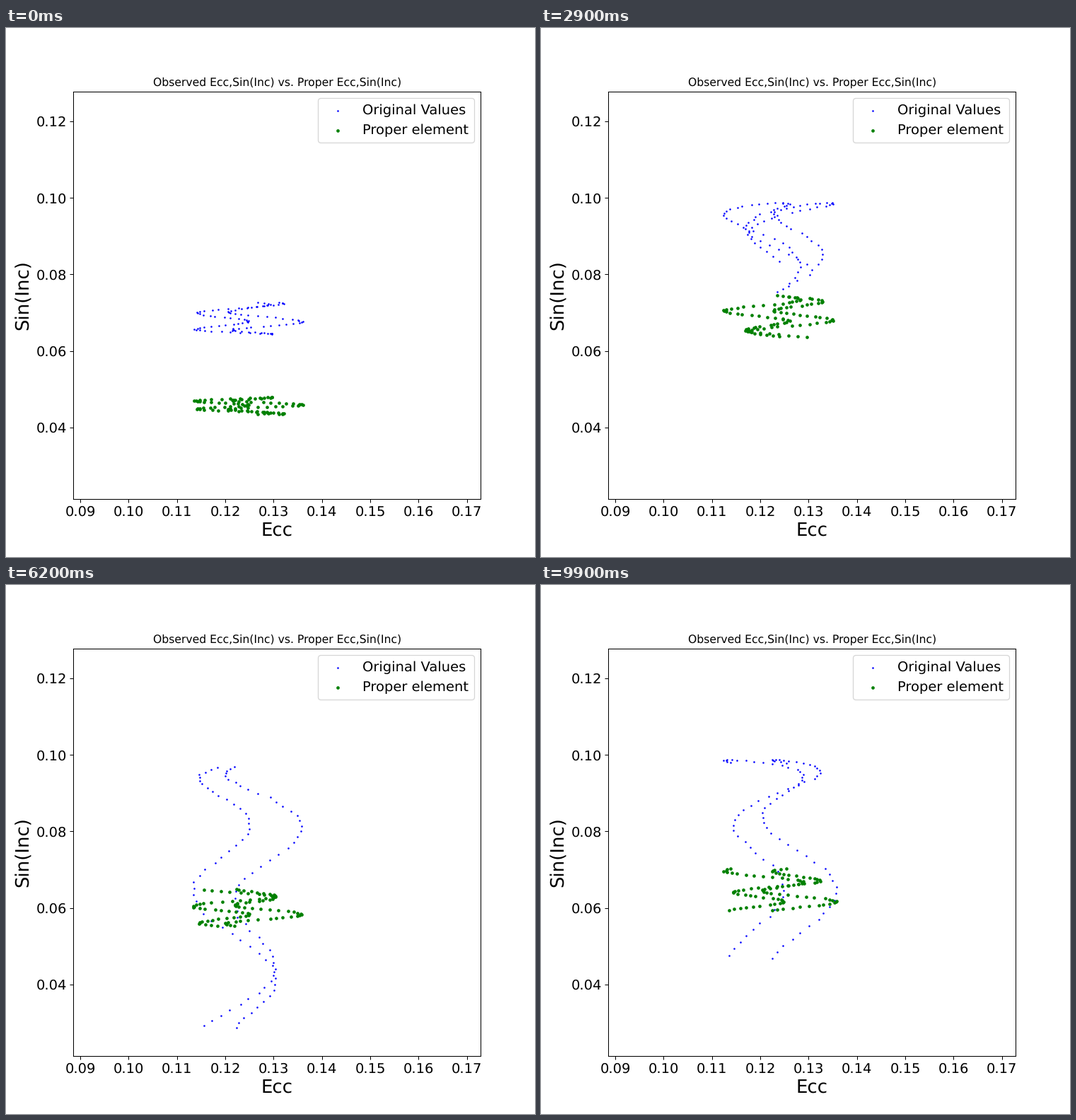
A matplotlib script for the animation above (10 s loop, 748 by 748 pixels).

```python
import numpy as np
import matplotlib.pyplot as plt
from matplotlib.animation import FuncAnimation

FRAMES, INTERVAL = 100, 100
POINTS = 100
SIZE = 748

plt.rcParams["text.hinting"] = "none"

k = np.arange(POINTS)
u = k / (POINTS - 1)              # position inside one time window
side = np.where(k % 2, 1, -1)     # alternate samples fall on two strands


def wave(cycles):
    return np.cos(2 * np.pi * cycles)


def eccentricity(n):
    """Two strands that swing together while their gap opens and closes."""
    swing = 0.0064 * wave(u / 0.48 - 0.52 - 0.783 * (n - 12))
    gap = 0.0055 * wave((u / 0.86 - 0.66 - 0.69 * (n - 29)) / 2)
    noise = np.random.default_rng(n).normal(0, 0.00025, POINTS)
    return 0.124 + swing + side * gap + noise


def inclinations(n):
    """Observed and proper sin(inc), both following a slowly chirped cycle."""
    m = n - 12
    mid = 0.5 + 0.28125 * m - 0.00092 * m * (m - 64)
    start = np.exp(-n / 4)        # the motion builds up from a calm start
    observed = (0.0567 + 0.0125 * start
                + 0.042 * (1 - 0.88 * start) * wave(mid + 0.32 * (u - 0.5)))
    lean = 0.011 * wave(0.579 * (n - 42))
    proper = (0.059 - 0.0092 * start + 0.0103 * wave(mid)
              - 0.0018 * wave(mid - 0.25) - lean * (u - 0.5))
    return observed, proper


fig, ax = plt.subplots(figsize=(8, 8), dpi=SIZE / 8)
ax.set_box_aspect(1)
ax.set(xlim=(0.0886, 0.17287), ylim=(0.02137, 0.1278))
ax.set_title("Observed Ecc,Sin(Inc) vs. Proper Ecc,Sin(Inc)", fontsize=12)
ax.set_xlabel("Ecc", fontsize=20)
ax.set_ylabel("Sin(Inc)", fontsize=20)
ax.tick_params(labelsize=15)
blue = ax.scatter([], [], s=4, c="blue", linewidths=0, label="Original Values")
green = ax.scatter([], [], s=13, c="green", linewidths=0, label="Proper element")
ax.legend(loc="upper right", fontsize=15)


def draw(n):
    x = eccentricity(n)
    for dots, y in zip((blue, green), inclinations(n)):
        dots.set_offsets(np.column_stack([x, y]))
    return blue, green


anim = FuncAnimation(fig, draw, frames=FRAMES, interval=INTERVAL, repeat=True)
plt.show()
```
